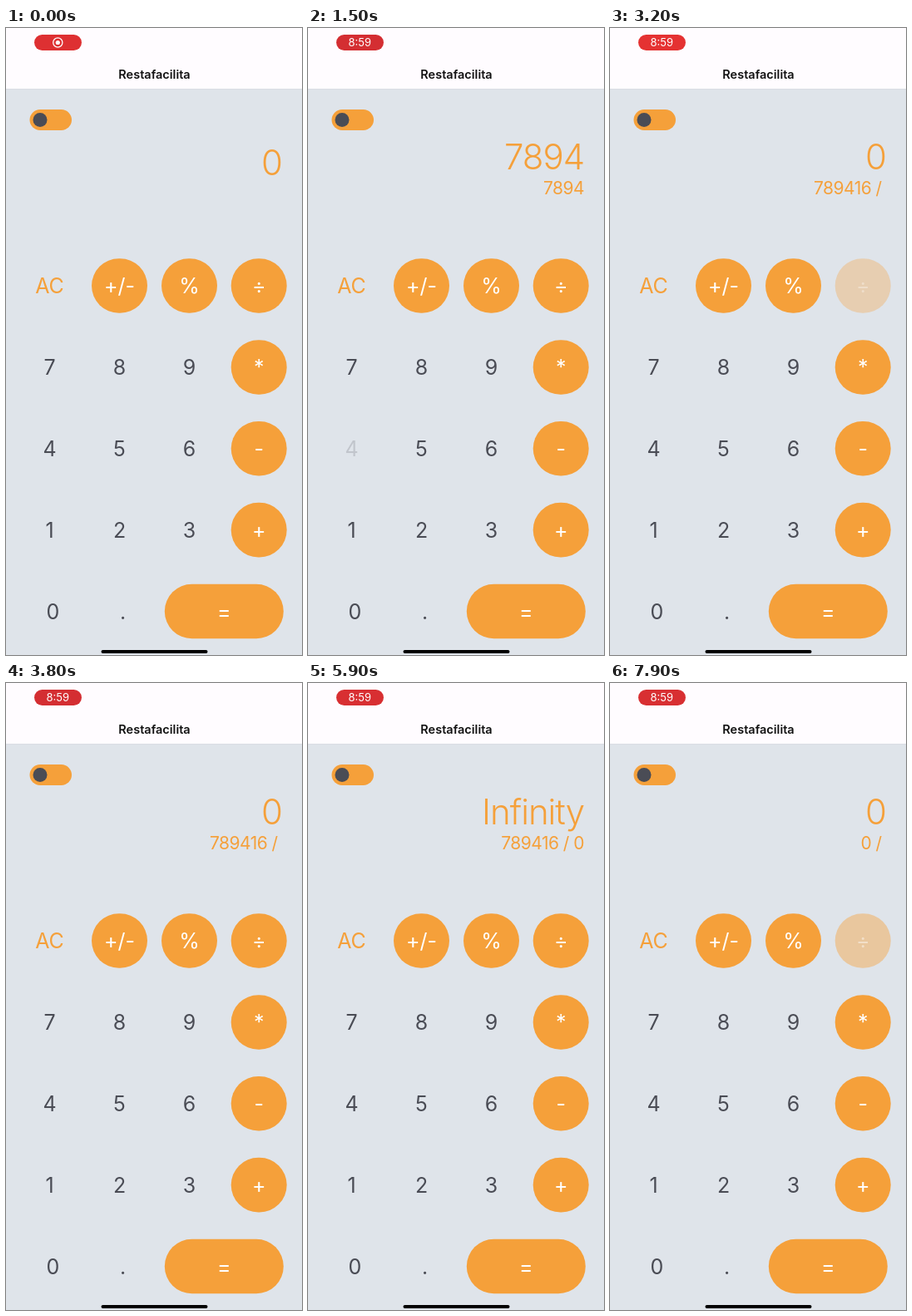
Recreate the animation shown at these times as an HTML page with a canvas. Size 356x754 px, loop 8000 ms.

```html
<!DOCTYPE html>
<html lang="es">
<head>
<meta charset="utf-8">
<style>
html, body { margin: 0; width: 100%; height: 100%; overflow: hidden; }
canvas { display: block; width: 356px; height: 754px; }
</style>
</head>
<body>
<canvas id="stage"></canvas>
<script>
const W = 356, H = 754, LOOP = 8000;
const ORANGE = '#f5a03a', DARK = '#4a4c55', PALE = '#dfe4ea', WHITE = '#fffcff';
const canvas = document.getElementById('stage');
const ctx = canvas.getContext('2d');
const dpr = window.devicePixelRatio || 1;
canvas.width = W * dpr;
canvas.height = H * dpr;
ctx.scale(dpr, dpr);

const columns = [52.5, 136.5, 220.5, 304.2];
const rows = [310, 408, 505.8, 603.6, 701.5];
const keys = [['AC', '+/-', '%', '÷'], ['7', '8', '9', '*'], ['4', '5', '6', '-'], ['1', '2', '3', '+']]
  .flatMap((labels, r) => labels.map((label, c) => ({
    label, x: columns[c], y: rows[r], w: c === 3 || (r === 0 && c > 0) ? 67 : 0
  })));
keys.push({ label: '0', x: 56.5, y: rows[4], w: 0 },
          { label: '.', x: 140.5, y: rows[4], w: 0 },
          { label: '=', x: 262.3, y: rows[4], w: 143 });

// Each tap: key, press time, release time, then the result and expression it leaves.
const taps = [
  ['7', 150, 300, '7', '7'],
  ['8', 580, 765, '78', '78'],
  ['9', 1030, 1150, '789', '789'],
  ['4', 1380, 1500, '7894', '7894'],
  ['1', 1720, 1840, '78941', '78941'],
  ['6', 2040, 2240, '789416', '789416'],
  ['÷', 2950, 3130, '0', '789416 / '],
  ['0', 4500, 4650, '0', '789416 / 0'],
  ['=', 4930, 5160, 'Infinity', '789416 / 0'],
  ['AC', 6050, 6230, '0', ''],
  ['÷', 7630, 7805, '0', '0 / ']
];

const ease = p => {
  p = Math.min(1, Math.max(0, p));
  return p < 0.5 ? 2 * p * p : 1 - 2 * (1 - p) ** 2;
};

function keyOpacity(label, t) {
  const tap = taps.filter(k => k[0] === label && t >= k[1]).pop();
  if (!tap) return 1;
  const [, down, up] = tap;
  return t < up ? 1 - 0.8 * ease((t - down) / 150) : 0.2 + 0.8 * ease((t - up) / 250);
}

function box(x, y, w, h, r, color) {
  ctx.fillStyle = color;
  ctx.beginPath();
  ctx.roundRect(x, y, w, h, r);
  ctx.fill();
}

function text(str, x, y, size, color, { align = 'center', weight = 400, spacing = 0 } = {}) {
  ctx.font = `${weight} ${size}px Inter, sans-serif`;
  ctx.letterSpacing = spacing * size + 'px';
  ctx.textAlign = align;
  ctx.fillStyle = color;
  ctx.fillText(str, x, y);
}

function circle(x, y, r) {
  ctx.beginPath();
  ctx.arc(x, y, r, 0, 2 * Math.PI);
}

function drawHeader(t) {
  box(0, 0, W, 73, 0, WHITE);
  box(0, 73, W, 0.6, 0, '#d5d8dd');
  const glow = Math.cos(2 * Math.PI * (t - 650) / 2000);
  box(34, 8, 57, 19, 9.5, `rgb(${232 + 22 * glow}, ${51 + 6 * glow}, 50)`);
  if (t < 1400) {
    ctx.strokeStyle = ctx.fillStyle = '#fff';
    ctx.lineWidth = 1.3;
    circle(62.3, 17.5, 5.6);
    ctx.stroke();
    circle(62.3, 17.5, 2.6);
    ctx.fill();
  } else {
    text('8:59', 62.3, 22, 13, '#fff');
  }
  text('Restafacilita', 178.5, 61, 14.5, '#111', { weight: 600 });
}

function drawDisplay(t) {
  const [, , , result, expression] = taps.filter(k => t >= k[2]).pop() || [0, 0, 0, '0', ''];
  const style = { align: 'right', spacing: -0.025 };
  text(result, 332, expression ? 170 : 177, 42, ORANGE, { ...style, weight: 300 });
  text(expression, 332, 199.5, 21, ORANGE, style);
}

function drawKey({ label, x, y, w }, t) {
  ctx.globalAlpha = keyOpacity(label, t);
  if (w) box(x - w / 2, y - 32.8, w, 65.6, 33, ORANGE);
  text(label, x, y + 9, 25, w ? '#fff' : label === 'AC' ? ORANGE : DARK);
  ctx.globalAlpha = 1;
}

function draw(now) {
  const t = now % LOOP;
  box(0, 0, W, H, 0, PALE);
  drawHeader(t);
  box(28.5, 98, 50.5, 25, 12.5, ORANGE);
  ctx.fillStyle = DARK;
  circle(41, 110.5, 8.5);
  ctx.fill();
  drawDisplay(t);
  keys.forEach(key => drawKey(key, t));
  box(114.5, 748, 128, 4, 2, '#000');
}

let start;
function tick(now) {
  start ??= now;
  draw(now - start);
  requestAnimationFrame(tick);
}
requestAnimationFrame(tick);
</script>
</body>
</html>
```
